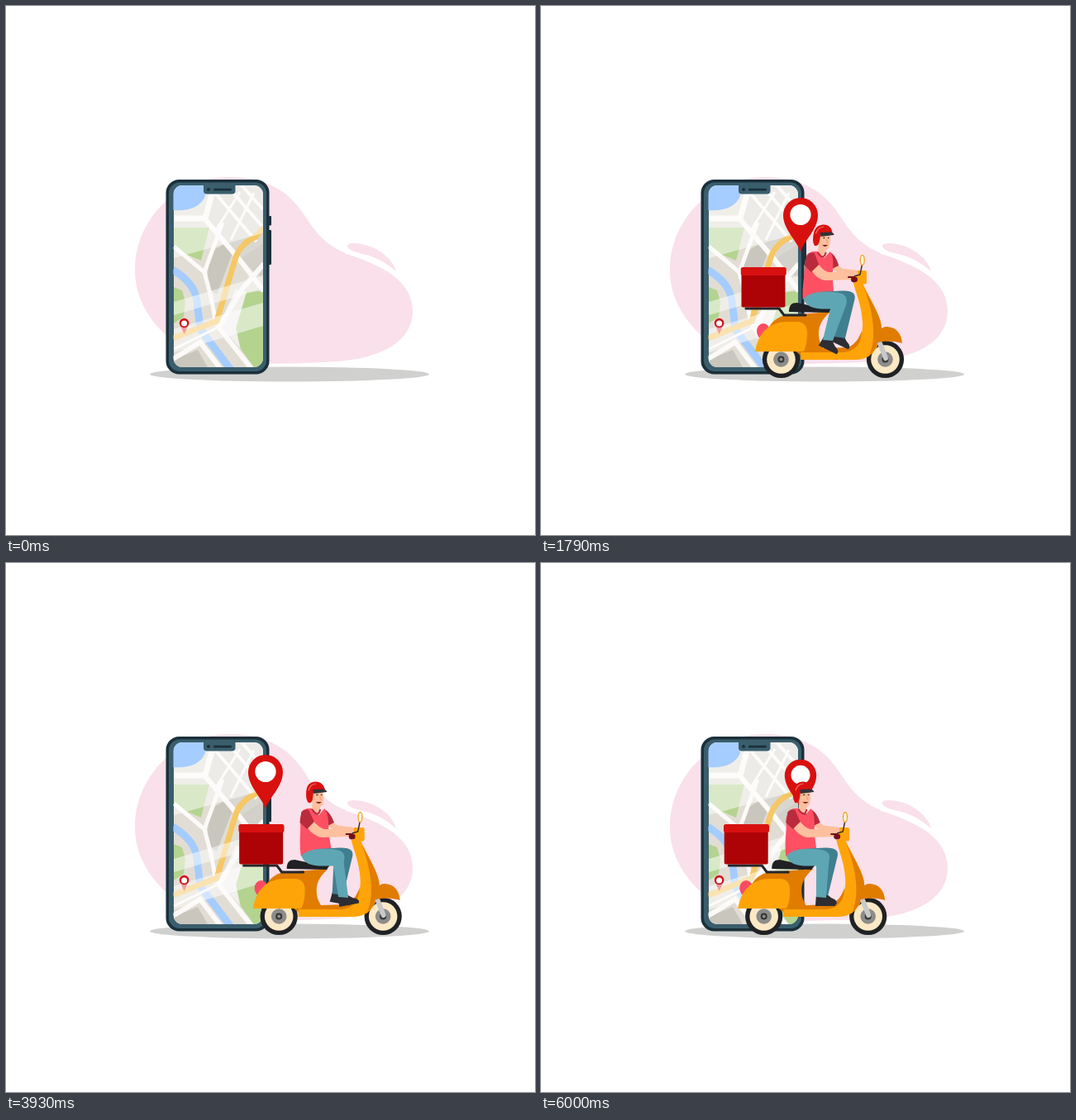
Animation, 640 px wide and 640 px high, one loop 6.07 s. Source, as an HTML page with a canvas:

```html
<!DOCTYPE html>
<html lang="en">
<head>
<meta charset="utf-8">
<title>Delivery scooter</title>
<style>
html, body { margin: 0; width: 100%; height: 100%; overflow: hidden; background: #fff; }
canvas { display: block; width: 640px; height: 640px; }
</style>
</head>
<body>
<canvas id="stage" width="640" height="640"></canvas>
<script>
const ctx = document.getElementById('stage').getContext('2d');
const LOOP = 6070, STEP = LOOP / 85;
const DARK = '#202124', ORANGE = '#ffa408', AMBER = '#e07c00', RED = '#d8110f';
const SKIN = '#fdbf9d', TEAL = '#5fa6b4', DEEP_TEAL = '#3f7f90';

function fill(d, color) {
  ctx.fillStyle = color;
  ctx.fill(new Path2D(d));
}
function line(d, color, width, cap = 'butt') {
  ctx.strokeStyle = color;
  ctx.lineWidth = width;
  ctx.lineCap = cap;
  ctx.lineJoin = cap === 'round' ? 'round' : 'miter';
  ctx.stroke(new Path2D(d));
}
function oval(x, y, rx, ry, color) {
  ctx.fillStyle = color;
  ctx.beginPath();
  ctx.ellipse(x, y, rx, ry, 0, 0, Math.PI * 2);
  ctx.fill();
}
function disc(x, y, r, color) { oval(x, y, r, r, color); }
function box(x, y, w, h, r, color) {
  ctx.fillStyle = color;
  ctx.beginPath();
  ctx.roundRect(x, y, w, h, r);
  ctx.fill();
}

// Draws a part scaled around its own anchor.
function grow(s, x, y, draw) {
  if (s <= 0) return;
  ctx.save();
  ctx.translate(x, y);
  ctx.scale(s, s);
  ctx.translate(-x, -y);
  draw();
  ctx.restore();
}
function pop(t, start, length) {
  const u = Math.min(1, Math.max(0, (t - start) / length));
  return 1 - Math.pow(1 - u, 2.7);
}

function backdrop() {
  fill('M156 320C156 260 204 207 272 207C318 207 343 227 359 250C377 277 386 291 424 304C464 319 492 336 492 370C491 410 446 427 400 430C372 432 345 432 318 433L225 420C190 402 156 366 156 320Z', '#f9e0ea');
  line('M411 297.5C434 301 456 310 474 326', '#fff', 5);
  fill('M413 290C414 286 425 286 438 290C456 296 469 309 472 321C460 311 449 304.5 436 301C424 298 413 296 413 290Z', '#f9e0ea');
  oval(343, 445.5, 169, 9, '#d0d1cf');
}

function map() {
  fill('M203 217H311V437H203Z', '#e2ddd4');
  fill('M240 256L260 217H311V300L284 304Z', '#d9d7d2');
  fill('M203 268H246L236 308L203 294Z', '#b4d48f');
  fill('M246 298L268 286L273 302L255 349L243 341Z', '#c9c6be');
  fill('M311 345L291 346L278 388L284 415L300 437H311Z', '#b3d38f');
  fill('M203 340L213 344L217 358L215 376L203 384Z', '#b3d38f');
  fill('M203 437L203 428L232 416L244 437Z', '#c9c6be');
  fill('M285 305L311 288V330L296 318Z', '#d3d0c9');
  fill('M258 386L278 342L291 346L278 390L283 414Z', '#f1f0ed');

  const road = (d, w) => line(d, '#fbfaf8', w);
  road('M203 257H241L252 217', 7);
  road('M203 291L240 322L262 262', 5);
  road('M240 322L248 352L254 384', 5);
  road('M240 257L281 305L312 345', 6);
  road('M252 225L303 285', 4);
  road('M267 217L311 268', 4);
  road('M285 217L311 246', 4);
  road('M283 225L253 273', 3);
  road('M300 226L272 283', 3);
  road('M312 312L286 342L258 388', 6);
  line('M202 319C219 330 229 341 231 357L235 391L272 440', '#a5ccff', 9);
  road('M202 427L235 407L259 438', 6);
  road('M255 386L298 440', 6);
  road('M203 415L254 390', 3);
  line('M312 268L301 280C289 285 281 295 278 304L266 344L255 381L202 402', '#f5c765', 7);

  fill('M203 217H311V275L203 305Z', 'rgba(255,255,255,.5)');
  fill('M203 358L311 326V342L203 374Z', 'rgba(255,255,255,.5)');
  fill('M203 391L311 359V387L203 419Z', 'rgba(255,255,255,.5)');
  fill('M202 217H240L241 230C236 242 222 249 202 247Z', '#a6cdff');
}

function phone() {
  box(316, 254, 5, 11.5, 1, '#1b303b');
  box(316, 271, 5, 42, 1, '#1b303b');
  box(193.5, 210, 125, 235.5, 16, '#1b303b');
  box(197, 213.5, 118, 228.5, 13, '#3a5e6c');
  ctx.save();
  ctx.beginPath();
  ctx.roundRect(202.5, 217, 108.5, 220, 11);
  ctx.clip();
  map();
  ctx.restore();
  box(239, 215, 38.5, 12.5, [0, 0, 4, 4], '#3a5e6c');
  disc(245, 222, 2, '#1b303b');
  box(251, 220.8, 22, 2.8, 1.4, '#1b303b');
  fill('M210.5 386H220.5L215.7 397Z', '#f09ca2');
  disc(215.6, 383.5, 5.8, '#cf1019');
  disc(215.6, 384, 3.5, '#fff');
}

function pin() {
  fill('M314 298C311 285 293 271 293 253A21 21 0 0 1 335 253C335 271 317 285 314 298Z', RED);
  disc(314, 252.5, 12.6, '#fff');
}

function wheel(x) {
  disc(x, 427.5, 22.6, DARK);
  disc(x, 427.5, 17.3, '#fbe8c5');
  disc(x, 427.5, 9.3, '#8c8c8a');
  disc(x, 427.5, 4, '#343434');
  disc(x, 427.5, 2, '#8c8c8a');
}

function scooterBody() {
  oval(250, 393.5, 8, 9.5, '#fb4b62');
  fill('M255 392C263 376 274 373 292 373L331 370C322 378 317 386 317 396C317 407 321 411 325 419L296 423Z', AMBER);
  fill('M240 418C244 395 257 382 280 382H292Q303 383 303 396Q303 409 299 418Z', ORANGE);
  fill('M295 419H345C362 416 371 402 370 383C369 362 362 348 359 335H370C377 352 394 375 393 392C391 413 381 428 362 428H295Z', ORANGE);
  fill('M370 336C377 354 394 376 393 391C392 404 386 416 378 423C388 401 383 369 370 336Z', AMBER);
  fill('M296 418L324 414L353 413C361 409 366 402 369 393C369 409 360 419 345 419H296Z', AMBER);
  box(361.5, 320, 13.5, 16.5, 2, ORANGE);
  line('M391 408L398 426', '#c8c9ca', 6, 'round');
  fill('M383 409C386 396 391 388 400 388C411 389 417 396 418 408C408 405 396 404 383 409Z', AMBER);
  fill('M281 370C281 362 284 359 291 359C302 361 318 366 333 366L329 371Z', DARK);
}

function cargo() {
  line('M229 366H269L275 374H301', '#25262b', 3, 'round');
  box(223.5, 323, 53, 41.5, 2, '#ad0307');
  box(222.8, 316, 55, 10, 2.5, RED);
}

function shoe(x, y, tilt) {
  ctx.save();
  ctx.translate(x, y);
  ctx.rotate(tilt);
  fill('M-6 -2L6 -1Q10 3 15 5Q19 8 17 11H-7Z', '#2d2d32');
  ctx.restore();
}

function legs(k) {
  const nx = 341 + 13 * k, fx = 342;
  shoe(fx, 402 - 4 * k * k, .45 * k * k);
  fill(`M316 346L345 344.5C358 344 363 348 360 357L${fx + 7} 402L${fx - 6} 400L338 360Z`, DEEP_TEAL);
  shoe(nx, 404, -.45 * k * Math.abs(k));
  const inner = 335 + 4 * k;
  fill(`M299 354C305 347 317 345 335 346C348 347 353 351 350 362L${nx + 6} 405L${nx - 6} 404L${inner} 366.5H320C308 366 300 361 299 354Z`, TEAL);
}

function torso() {
  line('M334 315L343 321L360 323', SKIN, 7, 'round');
  fill('M329 298C335 301 338 308 340 314L332 318Z', '#b92b3d');
  fill('M315 288H325L323 304L314 299Z', SKIN);
  fill('M303 299Q309 296 314 297L322 305L329 297Q333 302 333 312L333 328L335 346L298 355C296 339 300 320 299 309Z', '#fd5163');
  line('M314 298Q321 309 324 298', '#b92b3d', 2);
}

function arm() {
  fill('M301 301Q306 297 310 299L316 313L307 322L298.5 314Z', '#b92b3d');
  fill('M308 321L316 313Q321 320 328 322L356 322L362 325L358 331L324 332Q314 330 308 321Z', SKIN);
}

function head() {
  fill('M314 276H328L329 285L327 293Q323 297 317 293L313 287Z', SKIN);
  fill('M310 290C307 286 307.5 279 308.5 274C310 268 314 264.5 320 264.5C326 264.5 330 268 331 275L317 276L315.5 285Q314.5 291 310 290Z', RED);
  line('M311 275Q313 268 320 267', '#f2777a', 1, 'round');
  fill('M316 274L328 273.5Q333 274 333 277L317 279Z', '#33343a');
  line('M320 280.5H322M325.5 280.5H327', '#442b2a', 1.3);
  line('M324 282L325.5 287', '#e58f75', .8);
  fill('M319 289L326 289Q323 293 319 289Z', '#7c1e23');
}

function handlebar() {
  line('M360 327L367 325L369.5 313', '#332a25', 1.4);
  oval(369.8, 307.5, 3.1, 6.8, '#f0a21b');
  oval(369.8, 307.5, 1.8, 5.3, '#fff6e4');
  oval(360, 331, 4, 3.4, '#75101a');
  line('M353 328H360', '#75101a', 2, 'round');
}

// The upper body sways from the hip while the legs swing.
function lean(amount, draw) {
  ctx.save();
  ctx.transform(1, 0, -amount, 1, amount * 350, 0);
  draw();
  ctx.restore();
}

function rider(k) {
  const sway = -.05 * k - .015;
  lean(sway, torso);
  legs(k);
  lean(sway, () => {
    arm();
    head();
  });
  handlebar();
}

function render(t) {
  ctx.fillStyle = '#fff';
  ctx.fillRect(0, 0, 640, 640);
  backdrop();
  phone();
  if (t < 35) return;

  let size = pop(t, 0, 1400);
  if (t > 5490) size = (1 + Math.cos((t - 5490) * .001167)) / 2;
  grow(size, 314, 298, pin);

  const ride = Math.max(0, t - 754);
  const k = Math.cos((t - 3460) / 3400 * Math.PI * 2);
  ctx.save();
  ctx.translate(30.8 - 33 * Math.cos(ride / 2690 * Math.PI), 0);
  grow(pop(t, 200, 800), 271.5, 427.5, () => wheel(271.5));
  grow(pop(t, 560, 500), 397.5, 427.5, () => wheel(397.5));
  grow(pop(t, 240, 800), 329, 390, scooterBody);
  grow(pop(t, 0, 600), 250, 342, cargo);
  grow(pop(t, 280, 760), 320, 358, () => rider(k));
  ctx.restore();
}

const begin = performance.now();
function tick() {
  const t = (performance.now() - begin) % LOOP;
  render(Math.floor((t + 8) / STEP) % 85 * STEP);
  requestAnimationFrame(tick);
}
tick();
</script>
</body>
</html>
```
